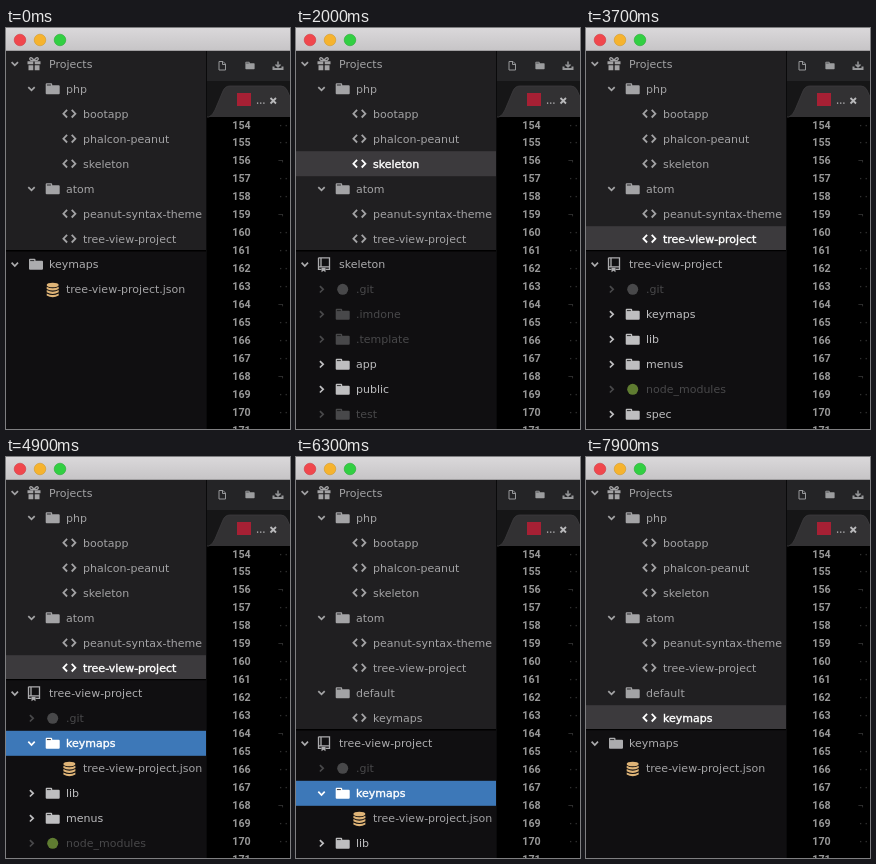
Recreate the animation shown at these times as an HTML page. Size 284 by 401 pixels, loop 8 s.

```html
<!DOCTYPE html>
<html lang="en">
<head>
<meta charset="utf-8">
<title>Project tree</title>
<style>
  html, body { margin: 0; width: 100%; height: 100%; overflow: hidden; background: #000; }
  svg { display: block; }
  .tree text { font: 11px "DejaVu Sans", sans-serif; fill: currentColor; }
  .tree .sel text { stroke: currentColor; stroke-width: .4px; }
  .nums text { font: 700 10.7px Roboto, sans-serif; fill: #979797; }
  .nums .ws { font: 9px "DejaVu Sans Mono", monospace; fill: #3a3a3a; }
  #menu text { font: 13.6px Inter, sans-serif; fill: #0c0c0e; }
  .scene, #menu { visibility: hidden; animation: 8s step-end infinite; }
  #start { animation-name: start; }
  #skeleton { animation-name: skeleton; }
  #package { animation-name: package; }
  #expanded { animation-name: expanded; }
  #added { animation-name: added; }
  #opened { animation-name: opened; }
  #menu { animation-name: menu; }
  @keyframes start { 0% { visibility: visible } 12.5%, 100% { visibility: hidden } }
  @keyframes skeleton { 0% { visibility: hidden } 12.5% { visibility: visible } 28.75%, 100% { visibility: hidden } }
  @keyframes package { 0% { visibility: hidden } 28.75% { visibility: visible } 58.75%, 100% { visibility: hidden } }
  @keyframes expanded { 0% { visibility: hidden } 58.75% { visibility: visible } 75%, 100% { visibility: hidden } }
  @keyframes menu { 0% { visibility: hidden } 65% { visibility: visible } 75%, 100% { visibility: hidden } }
  @keyframes added { 0% { visibility: hidden } 75% { visibility: visible } 91.25%, 100% { visibility: hidden } }
  @keyframes opened { 0% { visibility: hidden } 91.25%, 100% { visibility: visible } }
</style>
</head>
<body>
<svg width="284" height="401" viewBox="0 0 284 401">
  <defs>
    <linearGradient id="bar" x2="0" y2="1"><stop stop-color="#dad8da"/><stop offset="1" stop-color="#c6c4c6"/></linearGradient>
    <linearGradient id="glass" x2=".3" y2="1"><stop stop-color="#bcbcc0"/><stop offset="1" stop-color="#acacb0"/></linearGradient>
    <g id="down"><path d="M-3.2-1.6 0 1.7 3.2-1.6" fill="none" stroke="currentColor" stroke-width="1.7"/></g>
    <g id="right"><path d="M-1.6-3.2 1.7 0-1.6 3.2" fill="none" stroke="currentColor" stroke-width="1.7"/></g>
    <g id="folder"><path d="M-7-4.500q0-1 1-1h4.500q1 0 1 1v1H6q1 0 1 1V4.500q0 1-1 1H-6q-1 0-1-1z" fill="currentColor"/><path d="M-5.800-3.700h4" stroke="#1c1c1e" stroke-width=".9"/></g>
    <g id="code"><path d="M-2.300-3.800-6 0l3.700 3.800M2.300-3.800 6 0 2.300 3.800" fill="none" stroke="currentColor" stroke-width="1.800"/></g>
    <g id="gift">
      <path d="M-6.500-2.500h5.800v3h-5.800zM.7-2.500h5.800v3H.7zM-5.500 1.500h4.800V6.500h-4.800zM.7 1.500h4.800V6.500H.7z" fill="currentColor"/>
      <path d="M0-3q-5 0-4.200-2.400Q-2.600-7.500 0-3q2.600-4.500 4.200-2.400Q5-3 0-3" fill="none" stroke="currentColor" stroke-width="1.300"/>
    </g>
    <g id="repo">
      <path d="M-5.500-6.500H5.500V5H1.500M-2.500 5H-5.500V-6.500M-5.500 2.500H5.500M-3-6.500V2.500" fill="none" stroke="currentColor" stroke-width="1.300"/>
      <path d="M-2.500 3.500h4V8l-2-1.500-2 1.500z" fill="currentColor"/>
    </g>
    <g id="data" fill="#dfb477">
      <ellipse cy="-4.300" rx="6" ry="2.300"/>
      <path id="disc" d="M-6-2.600Q0 .6 6-2.600V-.4Q0 2.800-6-.4z"/>
      <use href="#disc" y="3.400"/><use href="#disc" y="6.700"/>
    </g>
    <circle id="git" r="5.500" fill="currentColor"/>
    <circle id="node" r="5.500" fill="#5f7c31"/>
  </defs>

  <g id="editor">
    <rect x="200" width="84" height="401"/>
    <rect x="200" y="23" width="84" height="30" fill="#242426"/>
    <rect x="200" y="53" width="84" height="36" fill="#161617"/>
    <path d="M203 89Q207 87 209 82L217 63Q219 58 224 58H275Q279 58 281 62L284 69V89z" fill="#323133"/>
    <path d="M200 89H203Q207 87 209 82L217 63Q219 58 224 58H275Q279 58 281 62L284 69" fill="none" stroke="#3d3c3e" stroke-width=".8"/>
    <g fill="none" stroke="#97989a">
      <path d="M213 33.500h4l2.500 2.500v6H213zM216.500 33.500v3h3"/>
      <path d="M272 33.500v5M269.500 36.500l2.500 2.500 2.500-2.500" stroke-width="1.500"/>
      <path d="M267.500 38.500v2.500h9v-2.500" stroke-width="2"/>
    </g>
    <use href="#folder" transform="translate(244 37.500) scale(.66)" color="#9c9d9f"/>
    <rect x="231" y="65" width="14" height="13" fill="#a62034"/>
    <text x="250" y="76" font-family="Noto Sans, sans-serif" font-size="12" fill="#a9a9ab">…</text>
    <path d="M264.500 70l5.500 5.500M270 70l-5.500 5.500" stroke="#b9b9bb" stroke-width="1.800"/>
    <g class="nums"></g>
  </g>

  <g class="tree"></g>

  <rect width="284" height="23" fill="url(#bar)"/>
  <path d="M0 22.500H284" stroke="#a19fa1"/>
  <g stroke-width=".6">
    <circle cx="14" cy="12" r="5.800" fill="#f0474d" stroke="#d23a40"/>
    <circle cx="34" cy="12" r="5.800" fill="#f6b32e" stroke="#d59a26"/>
    <circle cx="54" cy="12" r="5.800" fill="#32cf42" stroke="#28ac34"/>
  </g>

  <g id="menu">
    <rect x="87" y="287" width="179" height="130" rx="5" fill="url(#glass)" stroke="#77777b" stroke-width=".6"/>
    <path d="M87.500 315.500h178M87.500 346.500h178" stroke="#98989c"/>
    <path d="M245.500 325.500l8 4.800-8 4.800z" fill="#0c0c0e"/>
    <text x="108" y="304.500">Add Project</text>
    <text x="108" y="335">Git</text>
    <text x="108" y="366">Search in Directory</text>
    <text x="108" y="385.500">New File</text>
    <text x="108" y="405">New Folder</text>
  </g>
</svg>
<script>
  const PITCH = 25, FIRST = 36;
  const NORMAL = '#a3a3a5', BRIGHT = '#bebec0', DIM = '#48484a';

  // Row: [level, icon, label, arrow, colour]
  const group = (name, ...items) => [
    [1, 'folder', name, 'down'],
    ...items.map(item => [2, 'code', item]),
  ];
  const projects = [
    [0, 'gift', 'Projects', 'down'],
    ...group('php', 'bootapp', 'phalcon-peanut', 'skeleton'),
    ...group('atom', 'peanut-syntax-theme', 'tree-view-project'),
  ];
  const extended = [...projects, ...group('default', 'keymaps')];

  const root = (name, icon = 'repo') => [0, icon, name, 'down', '#acacae'];
  const dir = name => [1, 'folder', name, 'right', BRIGHT];
  const dim = (name, icon = 'folder') => [1, icon, name, 'right', DIM];

  const keymaps = [root('keymaps', 'folder'), [1, 'data', 'tree-view-project.json']];
  const skeleton = [root('skeleton'), dim('.git', 'git'), dim('.imdone'), dim('.template'),
    dir('app'), dir('public'), dim('test')];
  const closed = [root('tree-view-project'), dim('.git', 'git'), dir('keymaps'), dir('lib'),
    dir('menus'), dim('node_modules', 'node'), dir('spec')];
  const open = [root('tree-view-project'), dim('.git', 'git'), [1, 'folder', 'keymaps', 'down', BRIGHT],
    [2, 'data', 'tree-view-project.json'], dir('lib'), dir('menus'), dim('node_modules', 'node')];

  const use = (id, x) => `<use href="#${id}" x="${x}"/>`;

  function row([level, icon, label, arrow, color = NORMAL], y, fill) {
    const iconX = level ? 30 + 16.7 * level : icon === 'folder' ? 30 : 28;
    return `<g transform="translate(0 ${y})" class="${fill ? 'sel' : ''}" color="${fill ? '#fff' : color}">
      ${fill ? `<rect y="-12.5" width="200" height="25" fill="${fill}"/>` : ''}
      ${arrow ? use(arrow, 8.8 + 16.7 * level) : ''}${use(icon, iconX)}
      <text x="${43 + 17 * level}" y="4">${label}</text></g>`;
  }

  function scene(id, top, bottom, picked = -1, active = -1) {
    const middle = FIRST + top.length * PITCH, split = middle - 13.5;
    const draw = (rows, start, chosen, fill) => rows.map((r, i) =>
      row(r, start + i * PITCH, i === chosen && fill)).join('');
    return `<g class="scene" id="${id}">
      <rect y="23" width="200" height="378" fill="#201f21"/>
      <rect y="${split}" width="200" height="${401 - split}" fill="#100f11"/>
      ${draw(top, FIRST - .3, picked, '#3c3a3d')}
      <rect y="${split - .5}" width="200" height="1.5" fill="#000"/>
      ${draw(bottom, middle + .3, active, '#3d78b8')}
      <path d="M200.500 23V401" stroke="#0a0a0b"/></g>`;
  }

  document.querySelector('.tree').innerHTML =
    scene('start', projects, keymaps) +
    scene('skeleton', projects, skeleton, 4) +
    scene('package', projects, closed, 7) +
    scene('expanded', projects, open, 7, 2) +
    scene('added', extended, open, -1, 2) +
    scene('opened', extended, keymaps, 9);

  const blank = [156, 159, 164, 168];
  let lines = '';
  for (let n = 154; n <= 171; n++) {
    const y = 100.5 + (n - 154) * 17.95;
    lines += `<text x="226.300" y="${y}">${n}</text>
      <text class="ws" x="272" y="${y}">${blank.includes(n) ? '¬' : '···'}</text>`;
  }
  document.querySelector('.nums').innerHTML = lines;
</script>
</body>
</html>
```
